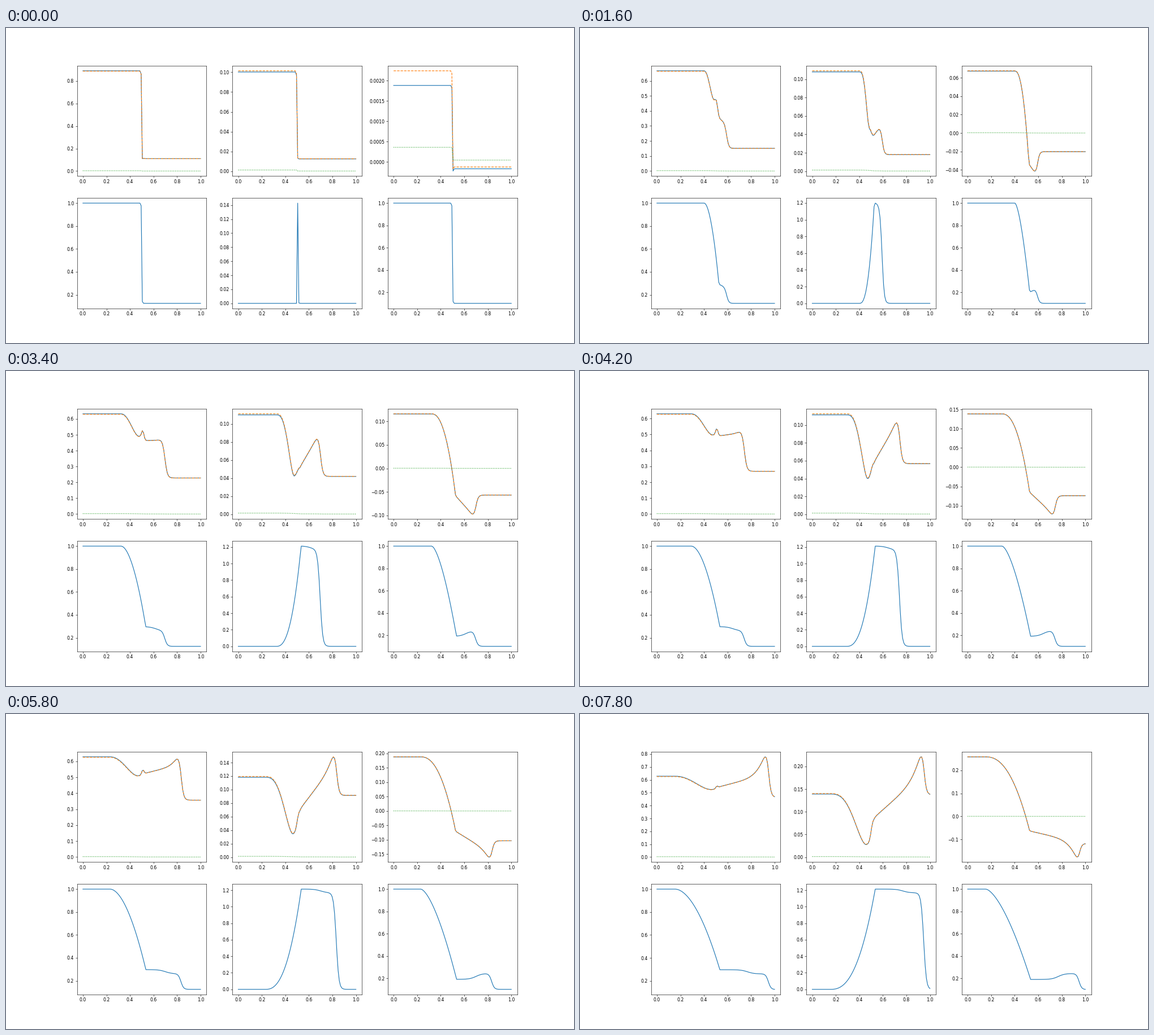
A matplotlib script that plays this animation: 1004x558 px, repeating every 8000 ms.

```python
import numpy as np
import matplotlib.pyplot as plt
from matplotlib.animation import FuncAnimation

DPI = 55.78
FRAMES, STEP_MS = 40, 200
X = np.linspace(0, 1, 100)


def rise(center, width):
    """Smooth step from 0 to 1."""
    return 0.5 + 0.5 * np.tanh((X - center) / (2 * width))


def smear(t):
    return np.tanh(5 * t)


def front(t):
    return 0.5 + 0.447 * t


def wave(t, left, dip, mid, right, power, tail, blunt=1, ramp=0, kink=0.5):
    """Fan from left to dip, step to mid at the diaphragm, shock down to right."""
    w = smear(t)
    head = 0.5 - 0.3 * t - 0.045 * w
    s = np.clip((X - head) / (tail - head), 0, 1)
    fan = 1 - (1 - s ** power) ** blunt
    y = left + (dip - left) * fan
    y = y + (mid + ramp - dip) * rise(kink, 0.0013 + 0.0075 * w)
    return y + (right - y) * rise(front(t), 0.00165 + 0.0095 * w)


def swell(t, slope, tip):
    """Ramp towards the shock: a straight part and a late sharp crest."""
    start = 0.5 + 0.025 * smear(t)
    r = np.clip((X - start) / (front(t) - start), 0, 1)
    return slope * r + tip * t ** 3 * r ** 6


def gas(t, left, plateau, shocked, right, power):
    contact = rise(0.5 + 0.27 * t, 0.028 * smear(t))
    return wave(t, left, plateau, plateau, right, power, 0.5 + 0.035 * smear(t),
                ramp=(shocked - plateau) * contact)


def density(t):
    return gas(t, 1, 0.297, 0.261, 0.125, 1.85)


def velocity(t):
    return gas(t, 0, 1.213, 1.168, 0, 2.5)


def pressure(t):
    return gas(t, 1, 0.19, 0.243, 0.1, 1.55)


def dip_place(t):
    return 0.5 - 0.012 * smear(t) - 0.028 * t


def first(t):
    y = wave(t, left=0.628 + 0.27 * np.exp(-9.4 * t),
             dip=0.465 + 0.06 * t,
             mid=0.56 - 0.41 * np.exp(-3.3 * t),
             right=0.11 + 0.115 * t + 0.44 * t ** 2 - 0.2 * t ** 3,
             power=2.1, blunt=2, tail=dip_place(t), kink=0.5 + 0.008 * smear(t),
             ramp=swell(t, 0.17 * t - 0.07, 0.25))
    bump = 0.56 * t * np.exp(-3.6 * t)
    return y + bump * np.exp(-((X - 0.509) / 0.014) ** 2)


def second(t):
    return wave(t, left=0.109 - 0.009 * np.exp(-10 * t) + 0.03 * t ** 4,
                dip=0.053 - 0.026 * t,
                mid=0.025 + 0.062 * t,
                right=0.0125 - 0.019 * t + 0.237 * t ** 2 - 0.093 * t ** 3,
                power=2.85, blunt=2, tail=dip_place(t),
                ramp=swell(t, 0.105 * t - 0.008, 0.075))


def third(t):
    base = -0.186 * t + 0.123 * t ** 2
    return wave(t, left=0.035 * (1 - np.exp(-12 * t)) + 0.155 * t + 0.068 * t ** 2,
                dip=base, mid=base,
                right=-0.05 * t - 0.27 * t ** 2 + 0.202 * t ** 3,
                power=2.3, tail=0.5 + 0.027 * smear(t),
                ramp=swell(t, 0.35 * t ** 3 - 0.4 * t ** 2, -0.1))


TOP = [(first, -0.003), (second, 0.0012), (third, 0.00036)]
BOTTOM = [density, velocity, pressure]

fig, axes = plt.subplots(2, 3, figsize=(1004.001 / DPI, 558.001 / DPI), dpi=DPI)
upper = [[ax.plot(X, X, style)[0] for style in ("-", "--", ":")] for ax in axes[0]]
lower = [ax.plot(X, X)[0] for ax in axes[1]]


def draw(k):
    t = (k + 0.13) / (FRAMES - 0.87)
    for lines, (curve, gap) in zip(upper, TOP):
        exact, error = curve(t), gap * density(t)
        for line, y in zip(lines, (exact, exact + error, abs(error))):
            line.set_ydata(y)
    for line, curve in zip(lower, BOTTOM):
        line.set_ydata(curve(t))
    for ax in axes.flat:
        ax.relim()
        ax.autoscale_view()
    return [line for lines in upper for line in lines] + lower


anim = FuncAnimation(fig, draw, frames=FRAMES, interval=STEP_MS, repeat=True,
                     repeat_delay=0, blit=False)
plt.show()
```
